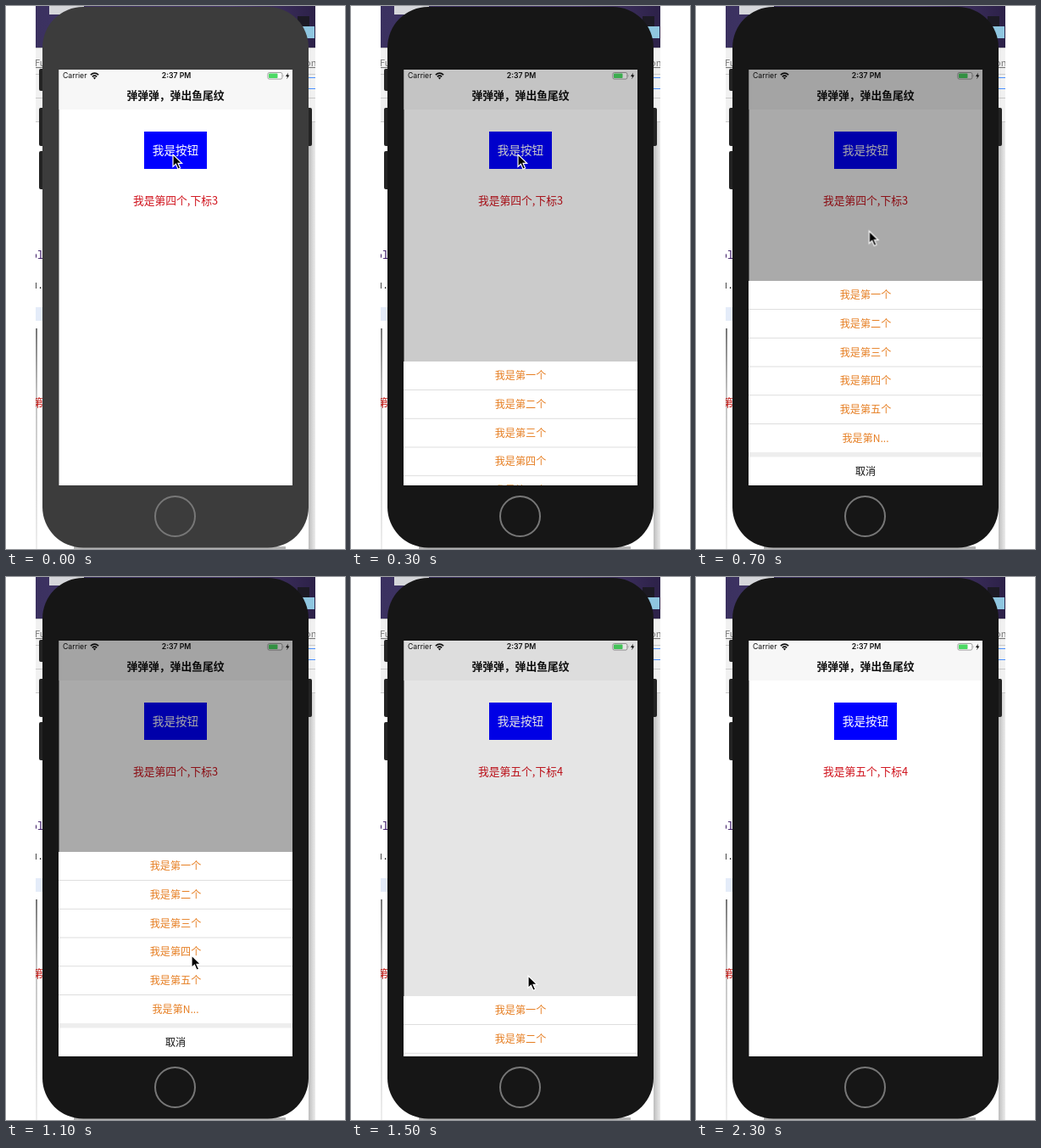
An HTML page that plays this animation: 400 px wide and 640 px high, repeating every 2400 ms.

```html
<!DOCTYPE html>
<html lang="zh-CN">
<head>
<meta charset="utf-8">
<title>Action sheet</title>
<style>
  html, body { margin: 0; width: 100%; height: 100%; overflow: hidden; background: #fff; }
  svg { display: block; width: 400px; height: 640px; }
  text { font-family: "Noto Sans CJK SC", "Noto Sans CJK", "Noto Sans CJK JP", sans-serif; }
  .mid { text-anchor: middle; }
  .status { font: 8.7px Inter, Roboto, sans-serif; fill: #111; }
  .code { font: 13px "Noto Sans Mono", "DejaVu Sans Mono", monospace; }
  .row { font-size: 12.1px; fill: #e67e22; }
  .result { font-size: 12.8px; fill: #d0111b; }

  /* Hard 100 ms steps; stops sit just ahead of each boundary. */
  .body, .dim, .sheet, .cursor, .result { animation: 2400ms step-end infinite; }
  .body { animation-name: body; }
  .dim { animation-name: dim; }
  .sheet { animation-name: sheet; }
  .cursor { animation-name: cursor; }
  .before { animation-name: before; }
  .after { animation-name: after; }

  @keyframes body {
    0% { fill: #3c3c3c; }
    4.16%, 100% { fill: #161616; }
  }
  @keyframes dim {
    0% { opacity: 0; }
    12.49% { opacity: .2; }
    16.66% { opacity: .33; }
    58.33% { opacity: .25; }
    62.49% { opacity: .1; }
    66.66%, 100% { opacity: 0; }
  }
  @keyframes sheet {
    0% { transform: translateY(241px); }
    12.49% { transform: translateY(95px); }
    16.66% { transform: translateY(-6px); }
    20.83% { transform: translateY(-3px); }
    24.99% { transform: translateY(0); }
    58.33% { transform: translateY(60px); }
    62.49% { transform: translateY(170px); }
    66.66%, 100% { transform: translateY(241px); }
  }
  @keyframes cursor {
    0% { transform: translate(197px, 175px); }
    20.83% { transform: translate(197px, 175px); animation-timing-function: steps(6); }
    45.83% { transform: translate(219px, 446px); animation-timing-function: steps(2); }
    54.16% { transform: translate(209px, 470px); }
    62.49% { transform: translate(209px, 470px); animation-timing-function: steps(4); }
    79.16% { transform: translate(279px, 576px); }
    83.33%, 100% { transform: translate(300px, 660px); }
  }
  @keyframes before {
    0% { opacity: 1; }
    58.33%, 100% { opacity: 0; }
  }
  @keyframes after {
    0% { opacity: 0; }
    58.33%, 100% { opacity: 1; }
  }
</style>
</head>
<body>
<svg viewBox="0 0 400 640">
  <defs>
    <clipPath id="desk"><path d="M35 0H365V640H35Z"/></clipPath>
    <clipPath id="screen"><path d="M62.5 75H338V565H62.5Z"/></clipPath>
    <linearGradient id="sky">
      <stop offset="0" stop-color="#3b3160"/>
      <stop offset=".7" stop-color="#4b3b70"/>
      <stop offset="1" stop-color="#2c2148"/>
    </linearGradient>
    <linearGradient id="edge">
      <stop offset="0" stop-color="#bdbdbd"/>
      <stop offset="1" stop-color="#ececec"/>
    </linearGradient>
    <linearGradient id="fade" x2="0" y2="1">
      <stop offset="0" stop-color="#777"/>
      <stop offset=".3" stop-color="#c4c4c4"/>
      <stop offset="1" stop-color="#eee"/>
    </linearGradient>
  </defs>

  <g clip-path="url(#desk)">
    <path fill="#fff" d="M35 0H365V640H35Z"/>
    <path fill="url(#sky)" d="M35 0H365V49H35Z"/>
    <path fill="#d5d6da" d="M51 0H92V10H51Z"/>
    <path fill="#1c1a24" d="M344 12H358V24H344Z"/>
    <path fill="#8fc6e0" d="M350 24H364V38H350Z"/>
    <path fill="#f1f1f1" d="M35 49H365V136H35Z"/>
    <path stroke="#c8c8c8" d="M35 49.5H365M35 80.5H365M35 108.5H365M35 136.5H365"/>
    <path stroke="#4a90ff" fill="none" d="M340 84.5H365M340 97.5H365"/>
    <path fill="#e4ecf9" d="M35 355H365V371H35Z"/>
    <path fill="url(#edge)" d="M357 137H365V640H357Z"/>
    <path fill="url(#fade)" d="M35 380H37V640H35Z"/>
    <path fill="#b5b5b5" d="M80 637H330V640H80Z"/>
    <g font-size="11" fill="#777" text-decoration="underline">
      <text x="34" y="71">Fu</text>
      <text x="353" y="71">on</text>
    </g>
    <text class="code" x="29" y="298" fill="#3d1a68">ol</text>
    <text class="code" x="29" y="333" fill="#111">u.</text>
    <text x="31" y="472" font-size="13" fill="#c41a16">第四</text>
  </g>

  <g fill="#242424">
    <rect x="39" y="74" width="8" height="26" rx="2"/>
    <rect x="39" y="120" width="8" height="45" rx="2"/>
    <rect x="39" y="171" width="8" height="45" rx="2"/>
    <rect x="353" y="120" width="8" height="45" rx="2"/>
  </g>
  <rect class="body" x="43" y="1" width="314" height="637.5" rx="48"/>
  <circle cx="199.5" cy="601.5" r="23.5" fill="none" stroke="#777" stroke-width="2"/>

  <g clip-path="url(#screen)">
    <path fill="#fff" d="M62 75H338V565H62Z"/>
    <path fill="#f7f7f7" d="M62 75H338V122H62Z"/>

    <text class="status" x="67" y="85.4">Carrier</text>
    <g fill="none" stroke="#111" stroke-width="1.6">
      <path d="M99.8 81.2Q104.5 77.2 109.2 81.2M101.8 83.3Q104.5 81 107.2 83.3"/>
      <path fill="#111" stroke="none" d="M102.8 84.6Q104.5 83.3 106.2 84.6L104.5 86.4Z"/>
    </g>
    <text class="status mid" x="201" y="85.4" style="font-weight:600">2:37 PM</text>
    <rect x="308.9" y="78.5" width="17" height="7.6" rx="1.8" fill="#fff" stroke="#888" stroke-width=".8"/>
    <rect x="310" y="79.6" width="10.5" height="5.4" rx=".8" fill="#4cd964"/>
    <path fill="#888" d="M326.8 81Q328.2 82.3 326.8 83.6Z"/>
    <path fill="#111" d="M333 78.5L330 82.9H332L331.2 86.2L334.4 81.6H332.3Z"/>

    <text class="mid" x="200" y="110" font-size="12.8" font-weight="700" fill="#111">弹弹弹，弹出鱼尾纹</text>
    <path fill="#00f" d="M163 148H237V192H163Z"/>
    <text class="mid" x="200" y="175.3" font-size="13.6" fill="#fff">我是按钮</text>
    <text class="mid result before" x="200" y="233.8">我是第四个,下标3</text>
    <text class="mid result after" x="200" y="233.8">我是第五个,下标4</text>

    <path class="dim" d="M62 75H338V565H62Z"/>

    <g class="sheet">
      <path fill="#fff" d="M62 324H338V580H62Z"/>
      <path stroke="#dedede" d="M62 357.5H338M62 391.3H338M62 425H338M62 458.7H338M62 492.5H338"/>
      <path fill="#eee" d="M62 526H338V531.5H62Z"/>
      <g class="mid row">
        <text x="200" y="345.2">我是第一个</text>
        <text x="200" y="378.9">我是第二个</text>
        <text x="200" y="412.6">我是第三个</text>
        <text x="200" y="446.4">我是第四个</text>
        <text x="200" y="480.1">我是第五个</text>
        <text x="200" y="513.8">我是第N...</text>
      </g>
      <text class="mid" x="200" y="552.5" font-size="12.1" fill="#111">取消</text>
    </g>
  </g>

  <g class="cursor">
    <path d="M0 0V14.4L3.4 11.3L6 17.2L8.6 16L6 10.3H10.6Z" stroke="#fff" stroke-width="1.2"/>
  </g>
</svg>
</body>
</html>
```
